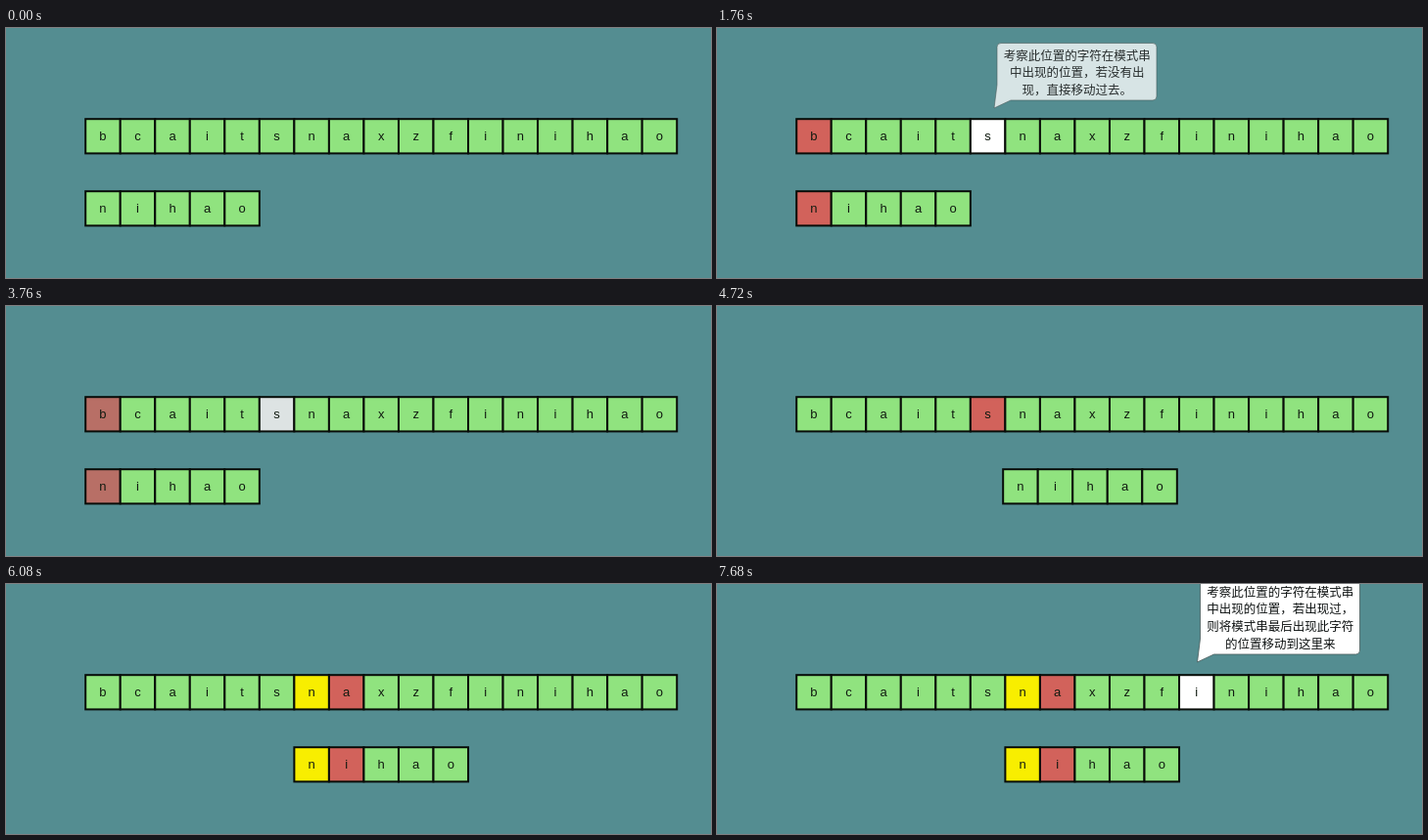
Animation of 720 by 256 pixels, one loop 8 s. Source, as an HTML page with a canvas:

```html
<!DOCTYPE html>
<html lang="zh-CN">
<head>
<meta charset="utf-8">
<title>Sunday string search</title>
<style>
  html, body { margin: 0; width: 100%; height: 100%; overflow: hidden; background: #548d91; }
  canvas { display: block; }
</style>
</head>
<body>
<canvas id="stage" width="720" height="256"></canvas>
<script>
const ctx = document.getElementById('stage').getContext('2d');
const LOOP = 8000, STEP = 80, FADE = 400;
const LEFT = 81.2, PITCH = 35.53, SIZE = 35.2;
const TEAL = '#548d91', GREEN = '#90e37f', RED = '#d2625b', YELLOW = '#f8ee00', WHITE = '#ffffff';

const text = { chars: 'bcaitsnaxzfinihao', y: 93.2 };
const pattern = { chars: 'nihao', y: 167.2 };

// Fill changes: start time, row, cell, colour
const fills = [
  [720, text, 0, RED], [720, pattern, 0, RED], [720, text, 5, WHITE],
  [3680, text, 0, GREEN], [3680, pattern, 0, GREEN], [3680, text, 5, RED],
  [5040, text, 5, GREEN], [5040, text, 6, YELLOW], [5040, pattern, 0, YELLOW],
  [5600, text, 7, RED], [5600, pattern, 1, RED],
  [6240, text, 11, WHITE]
];

const bubbles = [
  { x: 286, top: 15.5, bottom: 74, inAt: 1680, outAt: 3200, firstLine: 28,
    lines: ['考察此位置的字符在模式串', '中出现的位置，若没有出', '现，直接移动过去。'] },
  { x: 493.5, top: -4, bottom: 72, inAt: 7200, outAt: Infinity, firstLine: 8,
    lines: ['考察此位置的字符在模式串', '中出现的位置，若出现过，', '则将模式串最后出现此字符', '的位置移动到这里来'] }
];

const ramp = (t, start, length) => Math.min(1, Math.max(0, (t - start) / length));
const ease = p => (1 - Math.cos(Math.PI * p)) / 2;

function fillCell(x, y, color, alpha) {
  ctx.globalAlpha = alpha;
  ctx.fillStyle = color;
  ctx.fillRect(x, y, PITCH, SIZE);
  ctx.globalAlpha = 1;
}

function drawCell(row, i, x, t) {
  let from = GREEN, to = GREEN, p = 1;
  for (const [start, r, cell, color] of fills) {
    if (r === row && cell === i && t >= start) {
      from = to;
      to = color;
      p = ramp(t, start, FADE);
    }
  }
  fillCell(x, row.y, from, 1 - p);
  fillCell(x, row.y, to, p * p);
  ctx.strokeStyle = '#080c08';
  ctx.lineWidth = 2;
  ctx.strokeRect(x, row.y, PITCH, SIZE);
  ctx.fillStyle = '#101a10';
  ctx.font = '13px "Liberation Sans", Arial, sans-serif';
  ctx.textBaseline = 'alphabetic';
  ctx.fillText(row.chars[i], x + PITCH / 2, row.y + 22.2);
}

function drawRow(row, shift, t) {
  for (let i = 0; i < row.chars.length; i++) {
    drawCell(row, i, LEFT + shift + i * PITCH, t);
  }
}

function bubblePath({ x, top, bottom }) {
  const right = x + 163, r = 4;
  ctx.beginPath();
  ctx.moveTo(x + r, top);
  ctx.arcTo(right, top, right, bottom, r);
  ctx.arcTo(right, bottom, x, bottom, r);
  ctx.lineTo(x + 14, bottom);
  ctx.lineTo(x - 3, bottom + 8);
  ctx.lineTo(x, bottom - 16);
  ctx.arcTo(x, top, right, top, r);
  ctx.closePath();
}

function drawBubble(b, t) {
  const alpha = ramp(t, b.inAt, 104) * (1 - ramp(t, b.outAt, FADE));
  if (!alpha) return;
  ctx.globalAlpha = alpha;
  bubblePath(b);
  ctx.fillStyle = WHITE;
  ctx.fill();
  ctx.strokeStyle = '#4a5c5c';
  ctx.lineWidth = 0.8;
  ctx.stroke();
  ctx.globalAlpha = Math.sqrt(alpha);
  ctx.fillStyle = '#101414';
  ctx.font = '12.5px "Noto Sans CJK SC", "Noto Sans CJK", sans-serif';
  ctx.textBaseline = 'middle';
  b.lines.forEach((line, i) => ctx.fillText(line, b.x + 81.7, b.firstLine + i * 17.6));
  ctx.globalAlpha = 1;
}

function draw(now) {
  const t = Math.floor((now % LOOP) / STEP) * STEP;
  ctx.fillStyle = TEAL;
  ctx.fillRect(0, 0, 720, 256);
  ctx.textAlign = 'center';
  drawRow(text, 0, t);
  drawRow(pattern, 6 * PITCH * ease(ramp(t, 4000, 770)), t);
  bubbles.forEach(b => drawBubble(b, t));
}

const begin = performance.now();
function tick() {
  draw(performance.now() - begin);
  requestAnimationFrame(tick);
}
tick();
</script>
</body>
</html>
```
